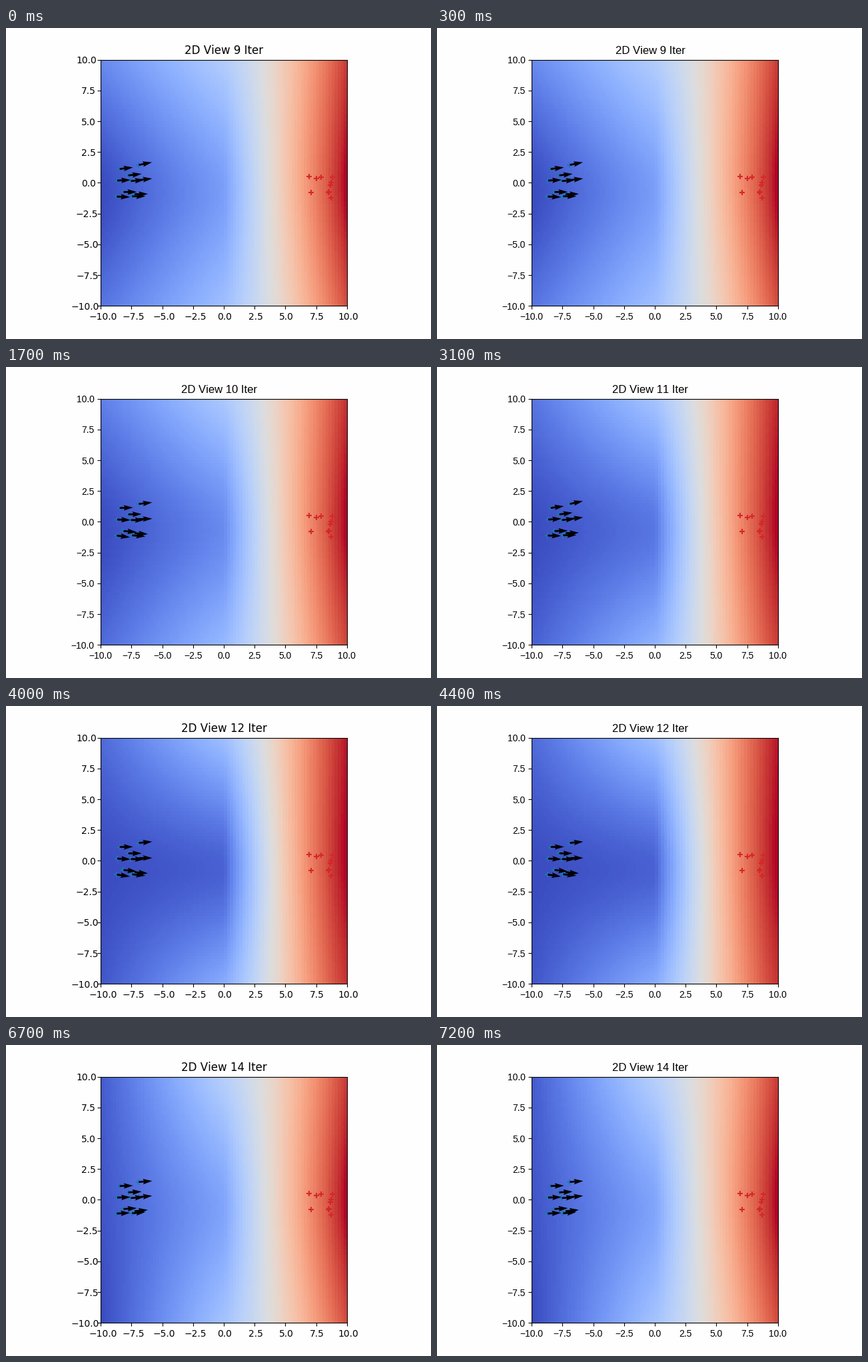
Animation of 638 by 467 pixels, one loop 8 s. Source, as a matplotlib script:

```python
import numpy as np
import matplotlib.pyplot as plt
from matplotlib.animation import FuncAnimation

plt.rcParams["text.kerning_factor"] = 6

W, H, DPI = 638, 467, 100
LEFT, BOTTOM, SIDE = 142.2, 49.8, 369.6
PT = DPI / 72
WIDE, NARROW = "DejaVu Sans", "Liberation Sans"
STEP, LOOP = 100, 8000

# Each iteration lasts PERIOD ms; its labels turn narrow after SWITCH ms
PERIOD, SWITCH, LEAD = 1375, 470, 210
FIRST_ITER, ITERS = 9, 6

AGENTS = np.array([(-8.46, 1.12), (-6.9, 1.45), (-7.76, .6), (-8.66, .18),
                   (-7.55, .14), (-6.9, .22), (-8.15, -.75), (-7.25, -.93),
                   (-8.7, -1.12), (-7.45, -1.1)])
TARGETS = np.array([(6.92, .52), (7.52, .34), (7.9, .46), (8.82, .46),
                    (8.7, .03), (8.65, -.2), (8.55, -.72), (8.52, -.78),
                    (7.09, -.78), (8.72, -1.22)])
TURN = [4, -1, 5, -2, 6, 4]     # mean heading per iteration, degrees


def field(k, n=80, mid=-0.5, soft=2.5):
    """Learned value on an n x n grid: a valley on the left, a hill on the right."""
    c = -10 + 20 * (np.arange(n) + 0.5) / n
    x, y = np.meshgrid(c / 10, c)
    left, right = np.clip(x + 1, 0, 1), np.clip(x, 0, 1)
    off = (np.hypot(y - mid, soft) - soft) / (np.hypot(10, soft) - soft)

    # The valley floor is lowest in the fourth iteration
    away = 3 - k if k <= 3 else 1.5 * (k - 3)
    centre = 0.05 + 0.05 * away
    axis = np.where(x < 0, centre * left,
                    1 - (1 - centre) * (1 - right) ** (1.35 - 1.6 * centre))

    near, far = 0.22 - 0.03 * away, 0.12 - 0.025 * k
    fan = np.where(x < 0, far + (near - far) * left,
                   near * (1 - right) ** 3 - (0.04 + 0.015 * away) * right)
    v = axis + fan * off + 0.002 * y
    return (v - v.min()) / (v.max() - v.min())


def headings(k):
    x, y = AGENTS.T
    spread = 4 if k < 4 else -1
    return np.radians(TURN[k] + spread * y + 2 * (x + 7.7))


fig = plt.figure(figsize=(W / DPI, H / DPI), dpi=DPI, facecolor="#fefefe")
ax = fig.add_axes([LEFT / W, BOTTOM / H, SIDE / W, SIDE / H])
ticks = np.linspace(-10, 10, 9)

fields = [field(k) for k in range(ITERS)]
heat = ax.imshow(fields[0], cmap="coolwarm", vmin=0, vmax=1, origin="lower",
                 extent=(-10, 10, -10, 10), interpolation="nearest",
                 aspect="auto")
ax.scatter(*AGENTS.T, marker="+", s=36, color="tab:blue", linewidths=1.5)
ax.scatter(*TARGETS.T, marker="+", s=36, color="tab:red", linewidths=1.5)
arrows = ax.quiver(*AGENTS.T, np.ones(10), np.zeros(10), color="black",
                   width=0.0075, scale_units="width", scale=SIDE / 20)
ax.set(xlim=(-10, 10), ylim=(-10, 10), xticks=ticks, yticks=ticks)
ax.tick_params(labelbottom=False, labelleft=False)


def pin_left(text):
    """Keep the text's present left edge as its anchor."""
    text.set_x(text.get_window_extent().x0 / fig.bbox.width)
    text.set_ha("left")


def label(px, py, value, ha, va):
    t = fig.text(px / W, py / H, f"{value:.1f}".replace("-", "\u2212"),
                 size=10, family=NARROW, ha=ha, va=va)
    pin_left(t)
    return t


labels = []
for v in ticks:
    offset = (v + 10) / 20 * SIDE
    labels.append(label(LEFT + offset, BOTTOM - 7 * PT, v, "center", "top"))
    labels.append(label(LEFT - 7 * PT, BOTTOM + offset - 0.02, v, "right",
                        "center_baseline"))
title = fig.text(0, (BOTTOM + SIDE + 6 * PT) / H, "", size=12, va="baseline")


def update(i):
    k, phase = divmod(i * STEP + LEAD, PERIOD)
    font = NARROW if phase >= SWITCH else WIDE

    heat.set_data(fields[k])
    a = headings(k)
    arrows.set_UVC(np.cos(a), np.sin(a))

    for t in labels:
        t.set_family(font)
    # The title is centred in the wide font, then keeps that left edge
    title.set(text=f"2D View {FIRST_ITER + k} Iter", family=WIDE, ha="center",
              x=(LEFT + SIDE / 2) / W)
    pin_left(title)
    title.set_family(font)
    return heat, arrows, title, *labels


anim = FuncAnimation(fig, update, frames=LOOP // STEP, interval=STEP,
                     repeat=True, repeat_delay=0, blit=False)
plt.show()
```
